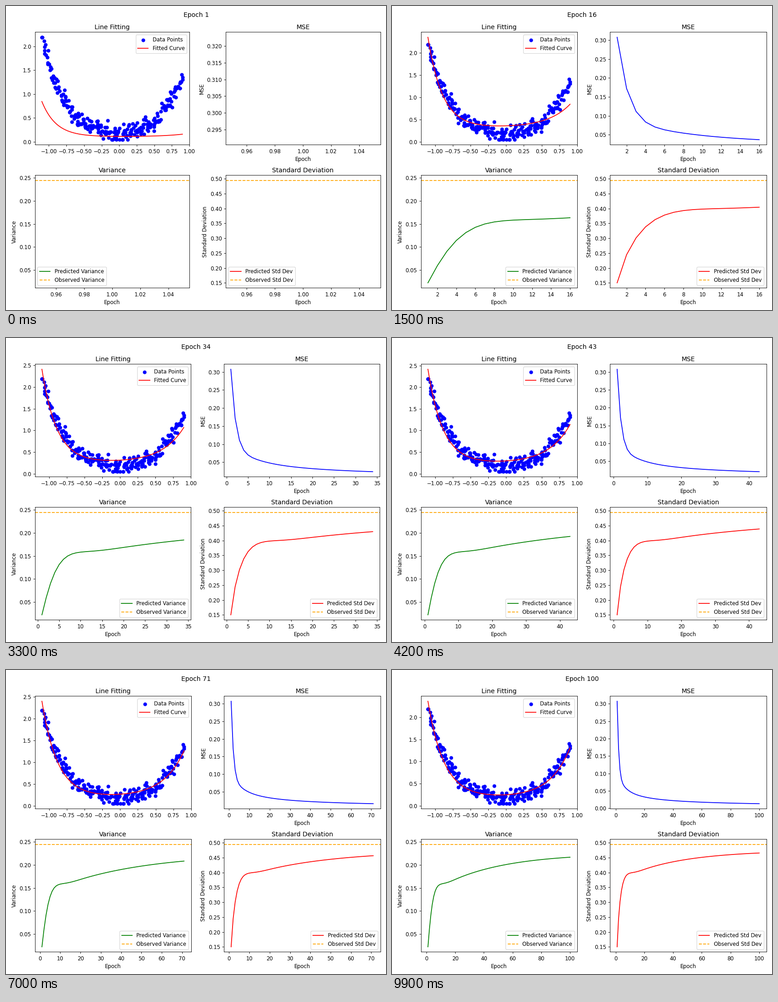
These frames come from a looping animation (837x669 px, 10000 ms). A matplotlib script:

```python
import numpy as np
import matplotlib.pyplot as plt
from matplotlib.animation import FuncAnimation

W, H, DPI = 837, 669, 83.7
EPOCHS = 100
OBSERVED_VAR = 0.2443

plt.rcParams["font.family"] = "DejaVu Sans"


def ringing(t, size, decay, freq):
    return size * np.exp(-decay * t) * np.cos(freq * t)


# Training history: a slow trend plus a quickly damped start
epochs = np.arange(1, EPOCHS + 1)
mse = 0.1787 * epochs**-0.57 + ringing(epochs - 1, 0.1286, 0.81, 0.45)
var = 0.225 - 0.0906 * np.exp(-0.0237 * epochs) - ringing(epochs - 1, 0.114, 0.33, 0.28)
std = np.sqrt(var)

# Noisy samples of a lopsided bowl
COUNT = 250
rng = np.random.default_rng(4)
data_x = np.clip(np.linspace(-1.1, 0.9, COUNT) + rng.normal(0, 0.02, COUNT), -1.1, 0.9)
data_y = (0.2 + 0.75 * data_x**2 + 0.7 * data_x**4
          + 0.25 * data_x**3 * (1.21 - data_x**2)
          + rng.normal(0, 0.095, COUNT))
data_y = np.clip(data_y, 0.045, 2.19)
curve_x = np.linspace(-1.1, 0.9, 200)


def fitted(i):
    """A floor with one exponential wall on each side."""
    warmup = min(1, (std[i] - std[0]) / (std[15] - std[0]))
    n = max(i + 1, 16)
    late = np.array([2.413 - 0.065 * np.log(n / 42)**2,
                     1.34 - 0.84 * np.exp(-0.033 * n),
                     0.17 + 0.24 * np.exp(-0.03 * n)])
    start = np.array([0.845, 0.16, 0.108])
    left, right, floor = start + (late - start) * warmup
    return (floor
            + (left - floor) * np.exp(-(5.0 - 0.006 * n) * (curve_x + 1.1))
            + (right - floor) * np.exp((3.1 + 0.004 * n) * (curve_x - 0.9)))


def limits(values):
    lo, hi = np.min(values), np.max(values)
    if lo == hi:
        lo, hi = lo - 0.05 * abs(lo), hi + 0.05 * abs(hi)
    margin = 0.05 * (hi - lo)
    return lo - margin, hi + margin


# The tiny surplus keeps the pixel size from rounding down
fig, ((ax_fit, ax_mse), (ax_var, ax_std)) = plt.subplots(
    2, 2, figsize=((W + 1e-4) / DPI, (H + 1e-4) / DPI), dpi=DPI)
title = fig.suptitle("Epoch 1")

ax_fit.set_title("Line Fitting")
ax_fit.scatter(data_x, data_y, color="blue", label="Data Points")
curve, = ax_fit.plot(curve_x, fitted(0), color="red", label="Fitted Curve")
ax_fit.set_xlim(-1.2, 1.0)
ax_fit.legend(loc="upper right")


def history(ax, name, color, label=None, observed=None):
    ax.set(title=name, xlabel="Epoch", ylabel=name)
    line, = ax.plot([], [], color=color, label=label)
    if observed is not None:
        ax.axhline(observed, color="orange", linestyle="--",
                   label=label.replace("Predicted", "Observed"))
        ax.legend(loc="best")
    return line


mse_line = history(ax_mse, "MSE", "blue")
var_line = history(ax_var, "Variance", "green", "Predicted Variance", OBSERVED_VAR)
std_line = history(ax_std, "Standard Deviation", "red", "Predicted Std Dev",
                   np.sqrt(OBSERVED_VAR))
tracks = [
    (ax_mse, mse_line, mse, []),
    (ax_var, var_line, var, [OBSERVED_VAR]),
    (ax_std, std_line, std, [np.sqrt(OBSERVED_VAR)]),
]


def arrange():
    """Fit the panels around the tick labels that stick out."""
    lo, hi = ax_mse.get_xlim()
    last = max(t for t in ax_mse.get_xticks() if t <= hi)
    room = (hi - last) / (hi - lo) * 345
    right = 824.5 - max(0, 3.7 * len(f"{last:g}") - room)

    ticks = ax_mse.get_yticks()
    three_decimals = round((ticks[1] - ticks[0]) * 1000) % 10 != 0
    gap = 79.9 if three_decimals else 72.4
    left = 63.5
    width = (right - left - gap) / 2
    fig.subplots_adjust(left=left / W, right=right / W, wspace=gap / width,
                        bottom=48.5 / H, top=611.5 / H, hspace=67 / 248)


def update(i):
    n = i + 1
    title.set_text(f"Epoch {n}")
    y = fitted(i)
    curve.set_ydata(y)
    ax_fit.set_ylim(limits(np.concatenate([data_y, y])))
    for ax, line, values, extra in tracks:
        line.set_data(epochs[:n], values[:n])
        ax.set_xlim(limits(epochs[:n]))
        ax.set_ylim(limits(np.concatenate([values[:n], extra])))
    arrange()
    return []


anim = FuncAnimation(fig, update, frames=EPOCHS, interval=100,
                     repeat=True, repeat_delay=0, blit=False)
plt.show()
```
